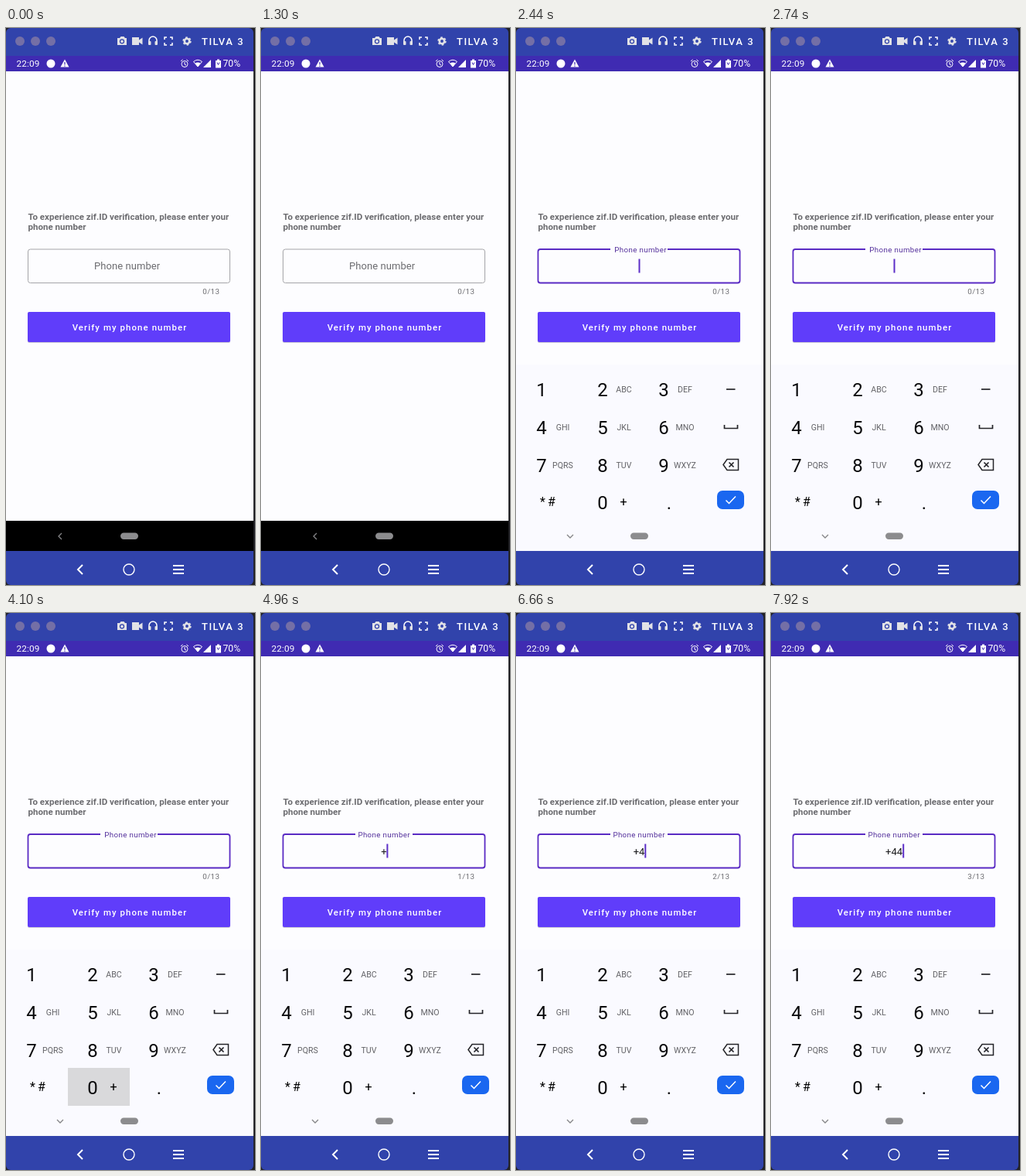
An HTML page that plays this animation: 322x720 px, repeating every 8 s.

```html
<!DOCTYPE html>
<html lang="en">
<head>
<meta charset="utf-8">
<title>Phone number entry</title>
<style>
  html, body { margin: 0; height: 100%; overflow: hidden; background: #222226; }
  svg { display: block; width: 100vw; height: 100vh; font-family: Roboto, sans-serif; }
  .line { fill: none; stroke: #fff; }
  .mid { text-anchor: middle; }
  .digit { font-size: 24px; fill: #0a0a0c; }
  .letters { font-size: 10.6px; fill: #626266; }
</style>
</head>
<body>
<svg viewBox="0 0 322 720" preserveAspectRatio="none">
  <defs>
    <clipPath id="screen"><rect y="56" width="320" height="620"/></clipPath>
  </defs>

  <!-- Emulator window -->
  <rect width="320" height="720" rx="6" fill="#3143ab"/>
  <g fill="#746fa6">
    <circle cx="18" cy="17" r="6"/><circle cx="38" cy="17" r="6"/><circle cx="58" cy="17" r="6"/>
  </g>
  <g fill="#e2e2e6">
    <path d="M144 13h3l1.500-2h4l1.500 2h2v9h-12z"/>
    <circle cx="150" cy="17.300" r="2.500" fill="none" stroke="#3143ab" stroke-width="1.300"/>
    <path d="M163 12h9v3.500l4.500-3v9l-4.500-3V22h-9z"/>
    <path d="M185 18v-2a5 5 0 0 1 10 0v2" class="line" stroke-width="1.500"/>
    <rect x="184" y="17" width="3.500" height="5" rx="1"/><rect x="192.500" y="17" width="3.500" height="5" rx="1"/>
    <path d="M205 15v-3h3m4 0h3v3m0 4v3h-3m-4 0h-3v-3" class="line" stroke-width="1.500"/>
    <circle cx="234" cy="17" r="3.200" fill="none" stroke="#e2e2e6" stroke-width="2.600"/>
    <circle cx="234" cy="17" r="4.900" fill="none" stroke="#e2e2e6" stroke-width="1.600" stroke-dasharray="2.570"/>
  </g>
  <text x="253" y="21.500" font-size="13" font-weight="500" letter-spacing="1.5" fill="#fff">TILVA 3</text>
  <path d="M99 694l-6 6 6 6M216 695h14M216 700h14M216 705h14" class="line" stroke-width="2"/>
  <circle cx="159" cy="700" r="7" class="line" stroke-width="1.400"/>

  <!-- Status bar -->
  <rect y="36" width="320" height="20" fill="#3f2bb2"/>
  <g fill="#fff">
    <text x="13.500" y="50" font-size="11.800" letter-spacing=".15">22:09</text>
    <circle cx="58" cy="46" r="5.500"/>
    <path d="M76 40.500l5.500 10h-11z"/>
    <path d="M76 44v3.500m0 1v1.300" stroke="#3f2bb2" stroke-width="1.200"/>
    <circle cx="231" cy="46.500" r="4" class="line"/>
    <path d="M231 44v3l2 1M226 43l2.500-2.200M236 43l-2.500-2.200" class="line"/>
    <path d="M242.500 43.500q5.500-4.500 11 0l-5.500 6.500z" class="line"/>
    <path d="M244.500 45.500q3.500-2 7 0l-3.500 4.500z"/>
    <path d="M265 41v10h-10z"/>
    <path d="M271 42h2v-1.500h3V42h2v9.500h-7z"/>
    <path d="M273 44.500l1.500 3 1.500-3" stroke="#3f2bb2" fill="none"/>
    <text x="280.500" y="50" font-size="12.200">70%</text>
  </g>

  <!-- App -->
  <rect y="56" width="320" height="582" fill="#fdfdff"/>
  <g font-size="11.550" font-weight="700" fill="#6c6c70">
    <text x="28.500" y="247.500">To experience zif.ID verification, please enter your</text>
    <text x="28.500" y="261">phone number</text>
  </g>
  <path id="outline" fill="none"/>
  <text id="label" class="mid">Phone number</text>
  <text id="entry" class="mid" x="159" y="312.500" font-size="13" fill="#1c1c1e"></text>
  <rect id="cursor" y="298.500" width="2" height="18" fill="#5c2fc8"/>
  <text id="counter" x="276.300" y="344" font-size="9.800" letter-spacing=".35" text-anchor="end" fill="#6c6c70"></text>
  <rect x="28" y="368" width="262" height="39" rx="2" fill="#c9c6d4"/>
  <rect x="28" y="367" width="262" height="39" rx="2" fill="#603dfa"/>
  <text x="160" y="390.700" class="mid" font-size="11.400" font-weight="500" letter-spacing="1.1" fill="#fff">Verify my phone number</text>

  <!-- Navigation bar and keyboard -->
  <rect y="637" width="320" height="39" fill="#000"/>
  <g clip-path="url(#screen)">
    <g id="keyboard">
      <rect y="435" width="320" height="241" fill="#fafaff"/>
      <rect id="pressed" width="80" height="49" fill="#d9d9db"/>
      <g id="keys"></g>
      <g fill="none" stroke="#242428" stroke-width="1.700">
        <path d="M272 467h11.500"/>
        <path d="M269.500 513v4.500h17V513"/>
        <path d="M273 557.500h14.500v14H273l-5-7z" stroke-width="1.500"/>
        <path d="M275.500 561.500l6 6m0-6l-6 6"/>
      </g>
      <rect x="260" y="598" width="35" height="24" rx="7" fill="#1a67f0"/>
      <path d="M271.500 610.500l4 4 8.500-9" class="line" stroke-width="1.500"/>
    </g>
  </g>
  <path id="chevron" d="M72 653l-4 4 4 4" fill="none" stroke="#858587" stroke-width="1.300"/>
  <rect x="148" y="652.500" width="23" height="8.500" rx="4.200" fill="#8c8c8e"/>
</svg>
<script>
const LOOP = 8000;
const FOCUS = 2075, KEYBOARD = 2100;
const PRESSES = [
  { from: 3800, to: 4480, x: 80, y: 588, char: '+' },
  { from: 6200, to: 6400, x: 0, y: 490, char: '4' },
  { from: 7430, to: 7630, x: 0, y: 490, char: '4' },
];
const BLINK_RESETS = [2300, ...PRESSES.map(press => press.to)];

const $ = id => document.getElementById(id);
const set = (id, attrs) => {
  for (const name in attrs) $(id).setAttribute(name, attrs[name]);
};
const mix = (a, b, p) => a + (b - a) * p;
const progress = (t, start, length) => Math.min(1, Math.max(0, (t - start) / length));

function buildKeys() {
  const letters = ['', 'ABC', 'DEF', 'GHI', 'JKL', 'MNO', 'PQRS', 'TUV', 'WXYZ'];
  const text = (kind, x, y, value) => `<text class="mid ${kind}" x="${x}" y="${y}">${value}</text>`;
  const symbol = (x, value) => `<text class="mid" x="${x}" y="618" font-size="16">${value}</text>`;
  let markup = '';
  letters.forEach((group, i) => {
    const x = 33 + 79 * (i % 3), y = 475.5 + 49 * Math.floor(i / 3);
    markup += text('digit', x, y, i + 1) + text('letters', x + 27.5, y - 5, group);
  });
  markup += text('digit', 112, 622, 0) + text('digit', 198, 622, '.');
  markup += symbol(34.5, '*') + symbol(46, '#') + symbol(139, '+');
  $('keys').innerHTML = markup;
}

function drawField(t) {
  const p = 1 - (1 - progress(t, FOCUS, 200)) ** 3;
  const focused = t >= FOCUS;
  const typed = PRESSES.filter(press => t >= press.to).map(press => press.char).join('');
  const gap = focused ? 37 * Math.min(1, p * 1.3) : 0;

  set('outline', {
    d: `M${159 + gap} 286H286.500q3 0 3 3v37.500q0 3-3 3H31.500q-3 0-3-3V289q0-3 3-3H${159 - gap}`,
    stroke: focused ? '#5a2bc4' : '#a4a4a8',
    'stroke-width': focused ? 1.8 : 1,
  });
  set('label', {
    x: typed ? 159.2 : mix(156.6, 161.1, p),
    y: mix(311.5, 290, p),
    'font-size': mix(13, 9.75, p),
    'letter-spacing': mix(0.08, 0.36, p),
    fill: focused ? '#54309c' : '#6c6c70',
  });

  const reset = BLINK_RESETS.filter(time => time <= t).pop();
  const lit = reset === undefined || (t - reset) % 1000 < 500;
  set('cursor', { x: 158.5 + 3.9 * typed.length, opacity: focused && lit ? 1 : 0 });
  $('entry').textContent = typed;
  $('counter').textContent = typed.length + '/13';
}

function drawKeyboard(t) {
  const p = 1 - (1 - progress(t, KEYBOARD, 260)) ** 2;
  set('keyboard', { transform: `translate(0 ${241 * (1 - p)})`, opacity: p ** 1.4 });
  set('chevron', { transform: `rotate(${-90 * progress(t, 2220, 140)} 70 657)` });
  const press = PRESSES.find(({ from, to }) => t >= from && t < to);
  set('pressed', { x: press ? press.x : 0, y: press ? press.y : 0, opacity: press ? 1 : 0 });
}

function frame(now) {
  const t = now % LOOP;
  drawField(t);
  drawKeyboard(t);
  requestAnimationFrame(frame);
}

buildKeys();
frame(0);
</script>
</body>
</html>
```
